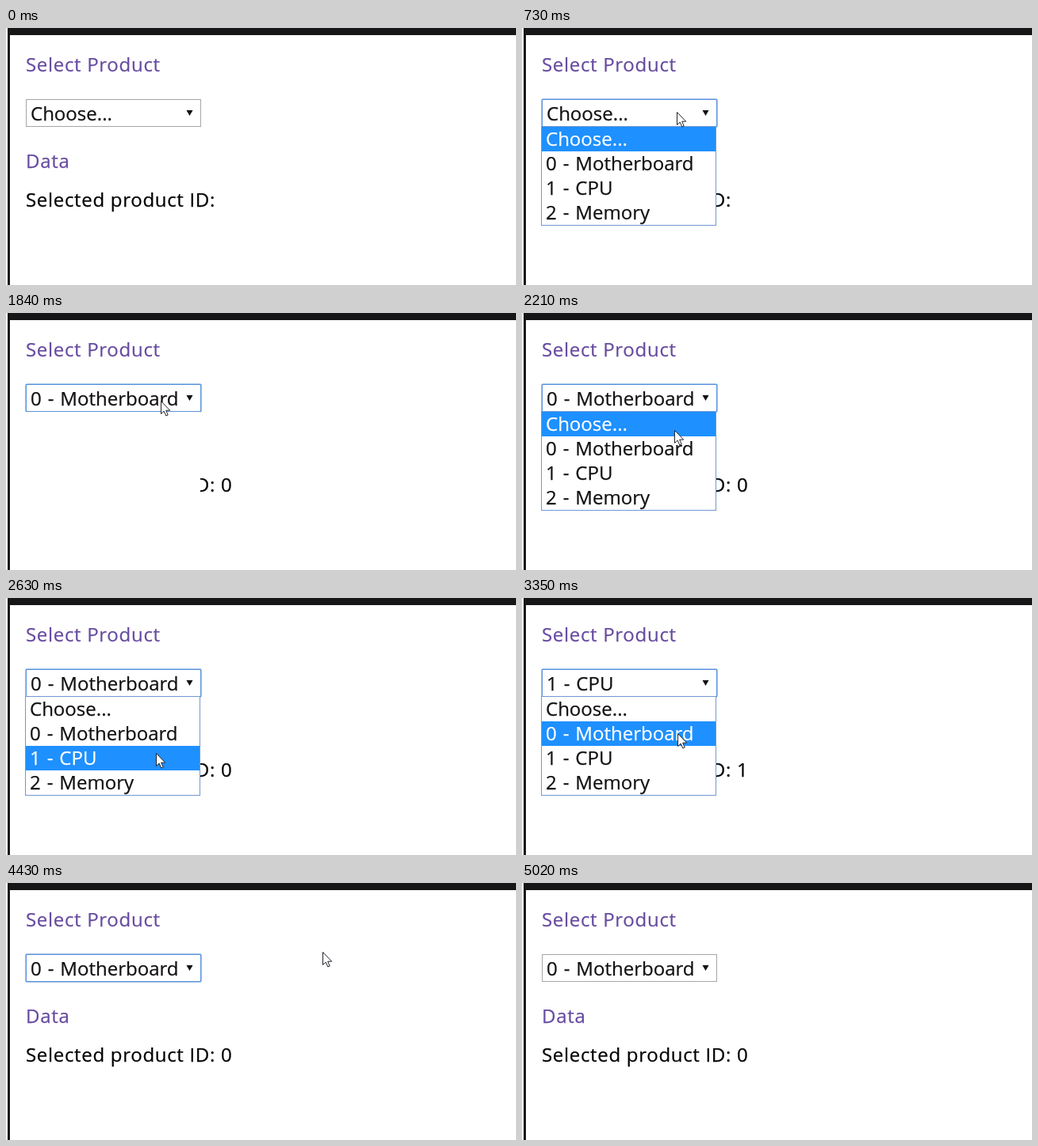
Animation of 643x325 px, one loop 5.15 s. Source, as an HTML page:

```html
<!DOCTYPE html>
<html lang="en">
<head>
<meta charset="utf-8">
<title>Select Product</title>
<style>
  html, body { margin: 0; width: 100%; height: 100%; overflow: hidden; background: #fff; }
  svg { display: block; width: 643px; height: 325px; }
  text { font: 24px "Open Sans", "Noto Sans", sans-serif; word-spacing: 1.7px; fill: #111; stroke: #111; stroke-width: .25px; }
  .page { letter-spacing: .7px; word-spacing: 0; fill: #000; stroke: #000; }
  .heading { fill: #674ba0; stroke: #674ba0; }
  .selected rect { fill: #1e90ff; }
  .selected text { fill: #fff; stroke: #fff; }
</style>
</head>
<body>
<svg viewBox="0 0 643 325">
  <path fill="#161618" d="M2 0H643V9H5V325H2Z"/>
  <text class="page heading" x="25" y="55">Select Product</text>
  <text class="page heading" x="25" y="177">Data</text>
  <text class="page" id="result" x="25" y="226"></text>

  <rect id="glow" x="24.5" y="89.5" width="222" height="36" rx="2" fill="none" stroke="#5b93dc" stroke-opacity=".55"/>
  <rect id="box" x="25.5" y="90.5" width="220" height="34" fill="#fff"/>
  <text id="value" x="31" y="117"></text>
  <path d="M227.5 104H235.5L231.5 111Z" fill="#111"/>

  <g id="popup">
    <rect x="24" y="125" width="221" height="125" fill="#fff"/>
    <g id="list">
      <rect x="24.5" y="124.5" width="220" height="125" fill="#fff" stroke="#7099d3"/>
    </g>
  </g>
  <path id="cursor" d="M.5 .5V16.5L4.2 13.1 6.8 19 9.2 18 6.7 12.2H11.7Z" fill="#fff" stroke="#20242c"/>
</svg>
<script>
const LOOP = 5150, ENTER = 150, LEAVE = 5020, BLANK = 70;
const ROW = 31, LIST_TOP = 125;
const options = ["Choose...", "0 - Motherboard", "1 - CPU", "2 - Memory"];
const $ = id => document.getElementById(id);

// Each time the list is open, and the option picked when it closes.
const visits = [
  { open: 660, close: 1560, pick: 1 },
  { open: 1840, close: 2770, pick: 2 },
  { open: 3050, close: 4220, pick: 1 }
];

// The pointer glides to each place in turn and rests there.
const entry = { x: 545, y: 0 };
const glides = [
  { start: ENTER, end: 590, x: 195, y: 106 },
  { start: 1000, end: 1490, x: 192, y: 168 },
  { start: 1560, end: 1840, x: 195, y: 111 },
  { start: 2070, end: 2630, x: 189, y: 196 },
  { start: 2770, end: 3050, x: 195, y: 104 },
  { start: 3210, end: 3560, x: 197, y: 208 },
  { start: 3800, end: 4050, x: 194, y: 178 },
  { start: 4220, end: 4920, x: 595, y: 0 }
];

const rows = options.map((label, i) => {
  const row = document.createElementNS("http://www.w3.org/2000/svg", "g");
  const top = LIST_TOP + i * ROW;
  row.innerHTML = `<rect x="25" y="${top}" width="219" height="${ROW}" fill="none"/>
    <text x="30" y="${top + 24}">${label}</text>`;
  $("list").append(row);
  return row;
});

const easeOut = k => 1 - (1 - k) ** 2;

function pointerAt(t) {
  let { x, y } = entry;
  for (const glide of glides.filter(g => g.start <= t)) {
    const k = easeOut(Math.min(1, (t - glide.start) / (glide.end - glide.start)));
    x += (glide.x - x) * k;
    y += (glide.y - y) * k;
  }
  return [Math.round(x), Math.round(y)];
}

const show = (id, visible) => $(id).setAttribute("visibility", visible ? "inherit" : "hidden");

function draw(t) {
  const [x, y] = pointerAt(t);
  const visit = visits.find(v => t >= v.open && t < v.close);
  const choice = visits.findLast(v => t >= v.close)?.pick ?? 0;
  const focused = t >= visits[0].open && t < LEAVE;
  const hovered = y >= LIST_TOP ? Math.floor((y - LIST_TOP) / ROW) : choice;

  $("value").textContent = options[choice];
  $("result").textContent = "Selected product ID:" + (choice ? " " + (choice - 1) : "");
  $("box").setAttribute("stroke", focused ? "#5b93dc" : "#a6a6a6");
  show("glow", focused);
  show("popup", visit);
  show("list", visit && t >= visit.open + BLANK); // blank just after opening
  rows.forEach((row, i) => row.classList.toggle("selected", i === hovered));
  show("cursor", t >= ENTER && t < LEAVE);
  $("cursor").setAttribute("transform", `translate(${x} ${y})`);
}

function tick() {
  draw(performance.now() % LOOP);
  requestAnimationFrame(tick);
}
tick();
</script>
</body>
</html>
```
